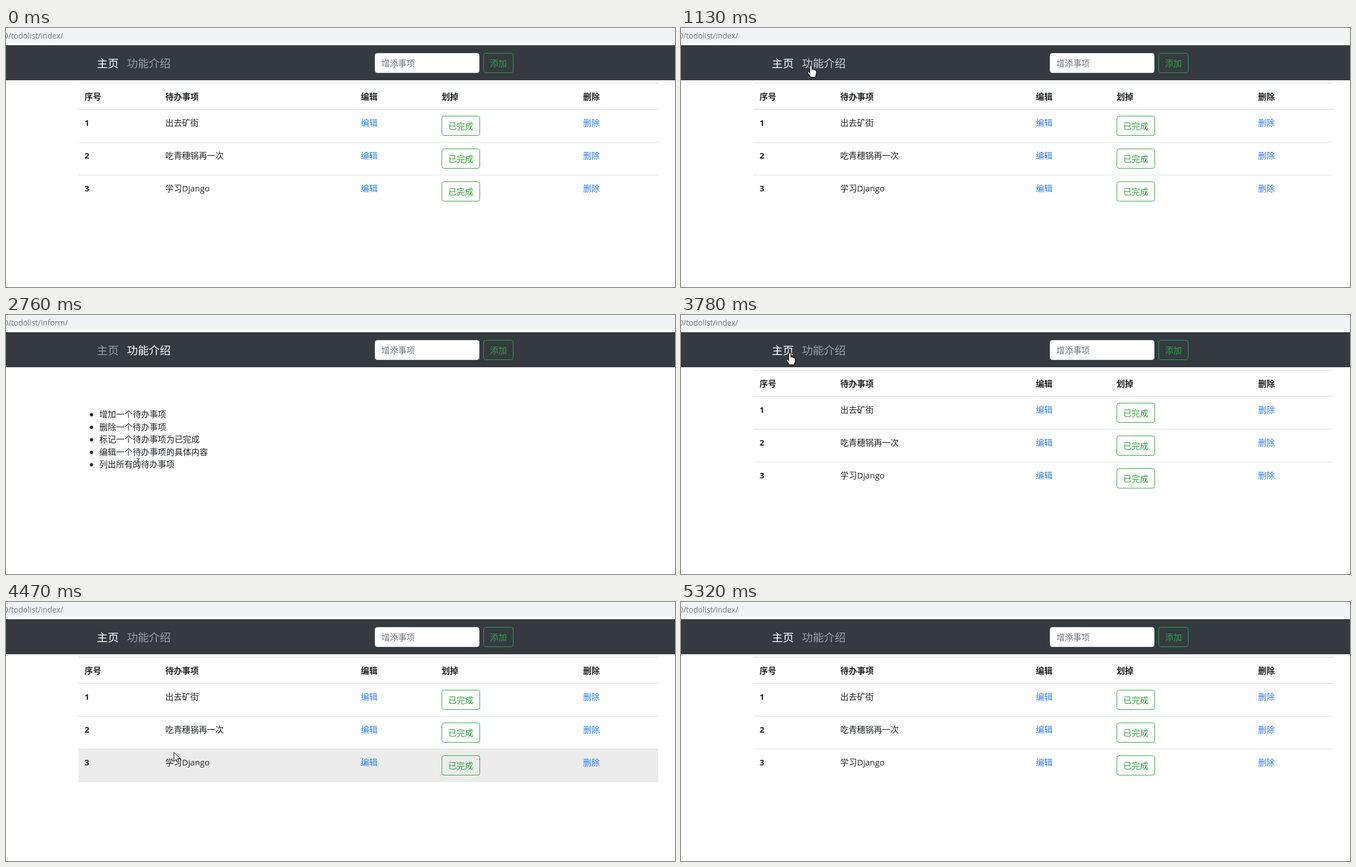
Recreate the animation shown at these times as an HTML page. Size 1201 by 466 pixels, loop 6.07 s.

```html
<!DOCTYPE html>
<html lang="zh-CN">
<head>
<meta charset="utf-8">
<style>
html, body { margin: 0; width: 100%; height: 100%; overflow: hidden; background: #fff; }
svg { display: block; }
text { font: 15px "Open Sans", "Noto Sans CJK SC", "Noto Sans CJK", sans-serif; fill: #212529; }
.bold { font-weight: 700; }
.nav { font-size: 19.7px; fill: #fff; }
.url { font-size: 13.8px; fill: #777b80; }
.link { fill: #2a7fff; }
.hint { fill: #6c757d; }
.green { fill: #2fa33c; }
.button { fill: none; stroke: #2fa33c; }
.row { fill: #ececec; }
.pointer { stroke: #000; fill: #fff; stroke-linejoin: round; }
</style>
</head>
<body>
<svg id="stage" width="1201" height="466" viewBox="0 0 1201 466"></svg>
<script>
const LOOP = 6070;
const ROW_TOP = 146.5, ROW_HEIGHT = 59.2;

// Bursts of pointer or page activity: start, end, number of steps
const bursts = [
  [70, 670, 9], [750, 1210, 7], [1360, 1530, 3], [1760, 2300, 8], [2370, 2910, 8],
  [2990, 3370, 6], [3540, 3780, 4], [4010, 4550, 8], [4620, 5160, 8], [5240, 5320, 2]
];

// Pointer path: time, x, y
const path = [
  [70, 560, 455], [300, 465, 310], [520, 350, 207], [670, 288, 140], [980, 206, 90],
  [1130, 233, 67], [1210, 242, 64], [1680, 242, 64], [2000, 251, 120], [2300, 240, 222],
  [2450, 236, 240], [2600, 238, 269], [2756, 237, 265], [2910, 242, 205], [2990, 243, 180],
  [3370, 195, 68], [3930, 195, 68], [4090, 206, 105], [4470, 300, 270], [4550, 318, 278],
  [4630, 400, 260], [4780, 680, 248], [4930, 940, 286], [5160, 1173, 440], [5320, 1173, 458]
];

const stage = document.getElementById("stage");
const el = id => document.getElementById(id);
const show = (id, on) => el(id).setAttribute("visibility", on ? "visible" : "hidden");
const text = (x, mid, str, cls = "", id = "") =>
  `<text x="${x}" y="${mid + 5.5}" class="${cls}" id="${id}">${str}</text>`;
const button = (x, y, w, label) =>
  `<rect class="button" x="${x + .5}" y="${y + .5}" width="${w - 1}" height="35" rx="4"/>` +
  text(x + 12, y + 18.5, label, "green");
const line = (y, h = 1) =>
  `<rect x="130" y="${y}" width="1041" height="${h}" fill="#dee2e6"/>`;

function tablePage() {
  const heads = [[141, "序号"], [286, "待办事项"], [637, "编辑"], [782, "划掉"], [1036, "删除"]];
  let out = heads.map(([x, s]) => text(x, 123, s, "bold")).join("");
  ["出去矿街", "吃青穗锅再一次", "学习Django"].forEach((task, i) => {
    const top = Math.round(ROW_TOP + i * ROW_HEIGHT), mid = 170 + i * 59;
    out += `<rect class="row" id="row${i}" x="130" y="${top}" width="1041" height="59"/>` +
      (i ? line(top - 1) : "") +
      text(141, mid, i + 1, "bold") + text(286, mid, task) +
      text(637, mid, "编辑", "link") + text(1036, mid, "删除", "link") +
      button(782, 158 + i * 59, 69, "已完成");
  });
  return out + line(99) + line(145.5, 1.5);
}

function infoPage() {
  const items = ["增加一个待办事项", "删除一个待办事项", "标记一个待办事项为已完成",
    "编辑一个待办事项的具体内容", "列出所有的待办事项"];
  return items.map((s, i) => {
    const mid = 178.5 + i * 22.5;
    return `<circle cx="153.5" cy="${mid + 1}" r="3" fill="#212529"/>` + text(167.5, mid, s);
  }).join("");
}

stage.innerHTML = `
  <rect width="1201" height="27" fill="#eff3f5"/>
  <rect width="1201" height="1" fill="#fafbfb"/>
  ${text(-4, 13.5, "", "url", "url")}
  <rect y="31" width="1201" height="63" fill="#343a40"/>
  ${text(163, 65, "主页", "nav", "home")}
  ${text(217, 65, "功能介绍", "nav", "about")}
  <rect x="662.5" y="45.5" width="187" height="35" rx="4" fill="#fff" stroke="#ced4da"/>
  ${text(674, 63, "增添事项", "hint")}
  ${button(857, 45, 54, "添加")}
  <g id="table">${tablePage()}</g>
  <g id="info">${infoPage()}</g>
  <g id="pointer">
    <path id="arrow" class="pointer" d="M0 0V16L4 12.5 6.5 18 9 17 6.5 11.5H11.5Z"/>
    <path id="hand" class="pointer" d="M-2 1Q0-1 1.5 1V7Q4 6 5 8 7 7 8 9 9.5 9 9.5 11V15L7.5 21H-1L-6 13Q-6 10.5-4 11.5L-2 13Z"/>
    <path id="beam" d="M-3-7.5H-1L0-6.5 1-7.5H3M0-6.5V6.5M-3 7.5H-1L0 6.5 1 7.5H3" fill="none" stroke="#222"/>
  </g>`;

// Time of the latest step that has taken place
function stepTime(t) {
  let s = 0;
  for (const [start, end, n] of bursts) {
    if (t < start) break;
    const gap = (end - start) / (n - 1);
    s = start + Math.min(n - 1, Math.floor((t - start + 8) / gap)) * gap;
  }
  return s;
}

function pointerAt(s) {
  const i = Math.max(1, path.findIndex(p => p[0] >= s));
  const [t0, x0, y0] = path[i - 1], [t1, x1, y1] = path[i];
  const k = Math.max(0, (s - t0) / (t1 - t0));
  return [x0 + (x1 - x0) * k, y0 + (y1 - y0) * k];
}

function draw(now) {
  const s = stepTime(now % LOOP);
  const info = s >= 1440 && s < 3620;
  const visible = s >= 70 && s < 5320;
  const [x, y] = visible ? pointerAt(s) : [-99, -99];
  const inNav = y > 50 && y < 80;
  const overHome = inNav && x >= 163 && x <= 203;
  const overAbout = inNav && x >= 217 && x <= 296;
  const hand = overHome || overAbout;
  const beam = info && y > 168 && y < 281;
  const shade = (active, over) => active ? 1 : over ? .75 : .5;

  el("url").textContent = `0/todolist/${info ? "inform" : "index"}/`;
  el("home").setAttribute("fill-opacity", shade(!info, overHome));
  el("about").setAttribute("fill-opacity", shade(info, overAbout));
  el("table").style.display = info ? "none" : "";
  el("info").style.display = info ? "" : "none";
  const hovered = Math.floor((y - ROW_TOP) / ROW_HEIGHT);
  for (let i = 0; i < 3; i++) show("row" + i, i === hovered);

  el("pointer").setAttribute("transform", `translate(${Math.round(x) + .5} ${Math.round(y) + .5})`);
  show("hand", visible && hand);
  show("beam", visible && beam);
  show("arrow", visible && !hand && !beam);
  requestAnimationFrame(() => draw(performance.now()));
}
draw(0);
</script>
</body>
</html>
```
